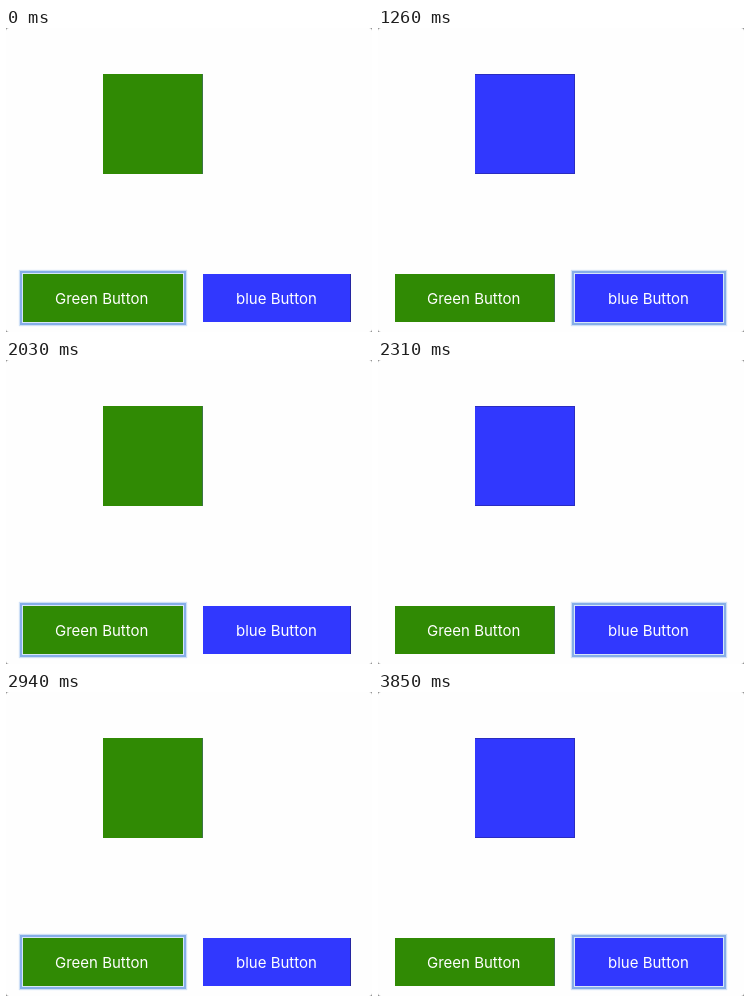
Animation of 366 by 304 pixels, one loop 3.92 s. Source, as an HTML page:

```html
<!DOCTYPE html>
<html lang="en">
<head>
<meta charset="utf-8">
<title>Color buttons</title>
<style>
  html, body { margin: 0; width: 100%; height: 100%; overflow: hidden; background: #8a8a8a; }
  .stage {
    position: relative; width: 366px; height: 304px;
    background: #fefefe; border-radius: 3px; overflow: hidden;
  }
  .stage > div { position: absolute; }
  .green { --fill: #308a04; --edge: #3c7448; }
  .blue { --fill: #3138fe; --edge: #2526a0; }
  .green, .blue { background: var(--fill); }
  .square {
    left: 97px; top: 46px; width: 100px; height: 100px;
    box-shadow: inset -1px 0 var(--edge);
  }
  .square.blue { box-shadow: inset -1px -1px #2a2cc0, inset 0 1px #2a2cc0; }
  .button {
    top: 246px; height: 48px; box-sizing: border-box; padding-left: 32px;
    font: 15px/49px Inter, Roboto, sans-serif; color: #fff; white-space: nowrap;
    box-shadow: inset -1px 0 var(--edge);
  }
  .button.green { left: 17px; width: 160px; }
  .button.blue { left: 197px; width: 148px; padding-left: 33px; }
  .button.focus {
    box-shadow: 0 0 0 1px #d6e6f8, 0 0 0 3px #86aee8, 0 0 1px 4px #cfe0f6;
  }
</style>
</head>
<body>
<div class="stage">
  <div class="square green" id="square"></div>
  <div class="button green focus" id="green">Green Button</div>
  <div class="button blue" id="blue">blue Button</div>
</div>
<script>
  const LOOP = 3920;
  // Pressing a button moves the focus; releasing it recolors the square.
  const clicks = [
    { press: 0, release: 0, color: 'green' },
    { press: 420, release: 700, color: 'blue' },
    { press: 1400, release: 1540, color: 'green' },
    { press: 2170, release: 2310, color: 'blue' },
    { press: 2660, release: 2940, color: 'green' },
    { press: 3150, release: 3430, color: 'blue' }
  ];
  const byId = id => document.getElementById(id);
  const latest = (key, t) => clicks.filter(c => c[key] <= t).pop().color;

  function draw() {
    const t = performance.now() % LOOP;
    const focus = latest('press', t);
    byId('square').className = 'square ' + latest('release', t);
    for (const id of ['green', 'blue']) byId(id).classList.toggle('focus', id === focus);
    requestAnimationFrame(draw);
  }
  draw();
</script>
</body>
</html>
```
